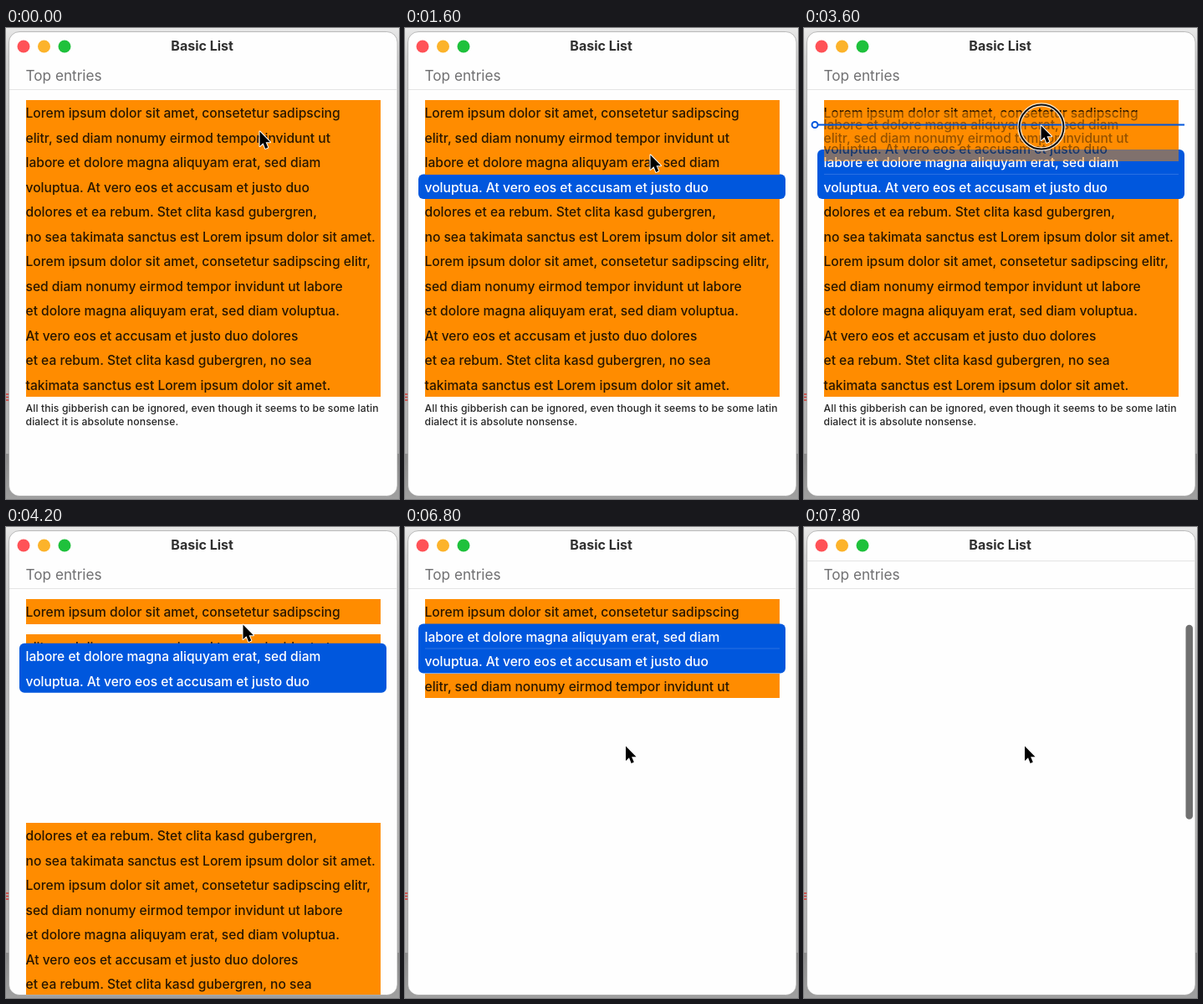
An HTML page for the animation above (8 s loop, 470x562 px).

```html
<!DOCTYPE html>
<html lang="en">
<head>
<meta charset="utf-8">
<title>Basic List</title>
<style>
  html, body { margin: 0; width: 100%; height: 100%; overflow: hidden; }
  svg { display: block; width: 470px; height: 562px; font-family: Inter, sans-serif; }
  .row rect { fill: #ff8c00; shape-rendering: crispEdges; }
  .row text { font-size: 15.6px; font-weight: 500; fill: #281600; }
  .row.on rect { fill: none; }
  .row.on text { fill: #fff; }
  .title { font-size: 16px; font-weight: 700; fill: #303030; text-anchor: middle; }
  .head { font-size: 17.2px; fill: #707072; }
  .note { font-size: 12.2px; font-weight: 500; letter-spacing: .11px; fill: #262626; }
  .rule { stroke: #e4e4e4; }
</style>
</head>
<body>
<svg viewBox="0 0 470 562">
  <defs>
    <linearGradient id="desk" x2="0" y2="1">
      <stop offset="0" stop-color="#e8e8e8"/>
      <stop offset=".06" stop-color="#d2d2d2"/>
      <stop offset=".3" stop-color="#bababa"/>
      <stop offset=".903" stop-color="#b2b2b2"/>
      <stop offset=".904" stop-color="#8c8c8c"/>
      <stop offset="1" stop-color="#a0a0a0"/>
    </linearGradient>
    <clipPath id="window"><rect x="4" y="5" width="463.5" height="553" rx="12"/></clipPath>
    <clipPath id="body"><rect x="4" y="74" width="464" height="484"/></clipPath>
  </defs>

  <rect width="470" height="562" fill="url(#desk)"/>
  <path d="M0 437h3.5M0 440.5h3M0 444h3.5" stroke="#d23a34" stroke-width="1.5"/>
  <rect x="3.5" y="4.5" width="464.5" height="554" rx="12.5" fill="#fefefe" stroke="#959595" stroke-opacity=".6"/>

  <g clip-path="url(#window)"><g clip-path="url(#body)">
    <g id="list">
      <g id="rest"><text class="note" x="23.5" y="457.7">All this gibberish can be ignored, even though it seems to be some latin<tspan x="23.5" y="473.5">dialect it is absolute nonsense.</tspan></text></g>
      <g id="picked">
        <rect id="select" x="16" width="439" rx="6" fill="#0057dd"/>
        <path id="divider" d="M24 174.5H448" stroke="#2a70e2"/>
      </g>
    </g>
    <g id="ghost" opacity=".5"></g>
    <g id="drop" fill="none" stroke="#0057dd" stroke-width="2">
      <circle cx="13" cy="115.5" r="3.5"/><path d="M17 115.5H455"/>
    </g>
  </g></g>

  <circle cx="21" cy="22" r="7.5" fill="#ff5257"/>
  <circle cx="45.5" cy="22" r="7.5" fill="#fcb32b"/>
  <circle cx="70" cy="22" r="7.5" fill="#1fc13c"/>
  <text class="title" x="234.6" y="27">Basic List</text>
  <text class="head" x="23.5" y="63">Top entries</text>
  <path class="rule" d="M4 73.5H467"/>
  <g id="scrolled">
    <path class="rule" d="M4 40.5H467"/>
    <rect id="knob" x="456.5" width="8.5" height="232" rx="4.25" fill="#707070"/>
  </g>

  <g id="pointer">
    <g id="press" fill="none">
      <circle r="26.5" stroke="#fff" stroke-width="4.5" stroke-opacity=".8"/>
      <circle r="26.5" stroke="#111" stroke-width="2"/>
    </g>
    <path d="M0 0V17.5L4 13.8 6.7 20.4 9.8 19.1 7.1 12.7H12.5Z" fill="#000" stroke="#fff" stroke-width="2" stroke-linejoin="round" paint-order="stroke"/>
  </g>
</svg>

<script>
const LOOP = 8000, STEP = 200, ROW = 29.5, TOP = 86;
const lines = [
  "Lorem ipsum dolor sit amet, consetetur sadipscing",
  "elitr, sed diam nonumy eirmod tempor invidunt ut",
  "labore et dolore magna aliquyam erat, sed diam",
  "voluptua. At vero eos et accusam et justo duo",
  "dolores et ea rebum. Stet clita kasd gubergren,",
  "no sea takimata sanctus est Lorem ipsum dolor sit amet.",
  "Lorem ipsum dolor sit amet, consetetur sadipscing elitr,",
  "sed diam nonumy eirmod tempor invidunt ut labore",
  "et dolore magna aliquyam erat, sed diam voluptua.",
  "At vero eos et accusam et justo duo dolores",
  "et ea rebum. Stet clita kasd gubergren, no sea",
  "takimata sanctus est Lorem ipsum dolor sit amet."
];

const $ = id => document.getElementById(id);
const list = $("list"), rest = $("rest"), picked = $("picked"), ghost = $("ghost");

function make(name, attrs, parent) {
  const el = document.createElementNS("http://www.w3.org/2000/svg", name);
  for (const key in attrs) el.setAttribute(key, attrs[key]);
  return parent.appendChild(el);
}

function makeRow(i, parent) {
  const g = make("g", { class: "row" }, parent), y = TOP + i * ROW;
  make("rect", { x: 23.5, y, width: 424.5, height: ROW }, g);
  make("text", { x: 23.5, y: y + 21.2 }, g).textContent = lines[i];
  return g;
}

const rows = lines.map((_, i) => makeRow(i, i > 3 ? rest : i > 1 ? picked : list));
list.append(picked);
picked.append($("divider"));
[2, 3].forEach(i => makeRow(i, ghost));

const smooth = p => (1 - Math.cos(Math.PI * p)) / 2;
const ramp = (t, from, to) => smooth(Math.min(1, Math.max(0, (t - from) / (to - from))));
const move = (el, x, y) => el.setAttribute("transform", `translate(${x} ${y})`);
const show = (el, on) => el.setAttribute("visibility", on ? "visible" : "hidden");

// time, x, y of the pointer tip
const path = [
  [0, 303.5, 123.5], [800, 298, 186], [1100, 298, 186], [1600, 293.5, 151.5],
  [2300, 283.5, 162], [2900, 283.5, 162], [3600, 283.5, 116.5],
  [5600, 283.5, 116.5], [6500, 264, 261.5], [LOOP, 264, 261.5]
];

function pointerAt(t) {
  const i = path.findIndex(p => p[0] > t), [t0, x0, y0] = path[i - 1], [t1, x1, y1] = path[i];
  const p = ramp(t, t0, t1);
  return [x0 + (x1 - x0) * p, y0 + (y1 - y0) * p];
}

function draw(t) {
  const [x, y] = pointerAt(t);
  move($("pointer"), x, y);
  move($("press"), .5, 1.5);
  show($("press"), (t >= 800 && t < 1200) || (t >= 2600 && t < 3800));

  const first = t >= 2600 ? 2 : t >= 1000 ? 3 : 4;
  rows.forEach((row, i) => row.classList.toggle("on", i >= first && i < 4));
  $("select").setAttribute("y", TOP + first * ROW);
  $("select").setAttribute("height", (4 - first) * ROW);
  show($("select"), first < 4);

  const dragging = t >= 3000 && t < 3800;
  show(ghost, dragging);
  move(ghost, 0, y - 162);
  show($("drop"), t >= 3400 && t < 3800);

  const p = ramp(t, 4055, 4535);
  move(rows[1], 0, 2 * ROW * p);
  move(picked, 0, -ROW * p);
  move(rest, 0, 714 * p);
  show($("divider"), first === 2 && (p === 0 || p === 1));

  const scroll = 167 * ramp(t, 7250, 7800);
  move(list, 0, -scroll);
  show($("scrolled"), scroll > 0);
  $("knob").setAttribute("y", 41.5 + scroll * .45);
}

function tick() {
  const t = performance.now() % LOOP;
  draw(Math.floor(t / STEP) * STEP);
  requestAnimationFrame(tick);
}
tick();
</script>
</body>
</html>
```
